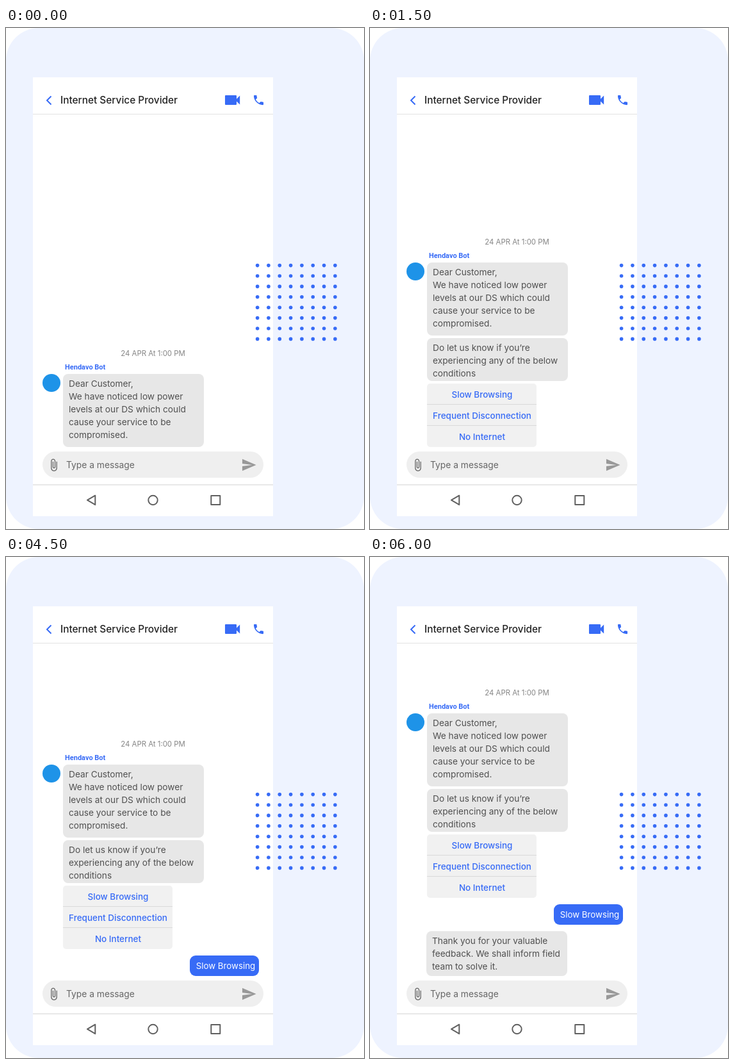
Write an HTML page that moves like this. It is 559 px wide and 782 px high and loops after 7.5 s.

```html
<!DOCTYPE html>
<html lang="en">
<head>
<meta charset="utf-8">
<title>Chat</title>
<style>
  html, body { margin: 0; width: 100%; height: 100%; overflow: hidden; background: #fff; }
  svg { display: block; width: 100%; height: 100%; }
  text { font: 13.7px Inter, sans-serif; fill: #505050; }
  .title { font-size: 15.4px; font-weight: 500; fill: #222; }
  .date { font-size: 11.4px; fill: #858585; }
  .name { font: bold 11px Roboto, sans-serif; fill: #376bf6; }
  .option { font-size: 13.5px; font-weight: 500; fill: #376bf6; }
  .answer { font-size: 13.3px; fill: #fff; }
  .hint { font-size: 13.8px; fill: #666; }
  .mid { text-anchor: middle; }
  .blue { fill: #376bf6; }
  .bubble { fill: #e7e7e7; }
  .nav { fill: none; stroke: #606060; stroke-width: 2; stroke-linejoin: round; }
</style>
</head>
<body>
<svg viewBox="0 0 559 782">
  <rect width="559" height="782" rx="51" fill="#eef3ff"/>
  <path d="M42 77h375v685H42z" fill="#fff"/>

  <path d="M70.5 106.5l-6.5 6.5 6.5 6.5" fill="none" stroke="#376bf6" stroke-width="2"/>
  <text class="title" x="85" y="118">Internet Service Provider</text>
  <path class="blue" transform="translate(338.1 97.4) scale(1.29 1.26)" d="M17 10.5V7c0-.55-.45-1-1-1H4c-.55 0-1 .45-1 1v10c0 .55.45 1 1 1h12c.55 0 1-.45 1-1v-3.5l4 4v-11l-4 4z"/>
  <path class="blue" transform="translate(384.4 102.5) scale(.84)" d="M6.62 10.79c1.44 2.83 3.76 5.14 6.59 6.59l2.2-2.2c.27-.27.67-.36 1.02-.24 1.12.37 2.33.57 3.57.57.55 0 1 .45 1 1V20c0 .55-.45 1-1 1-9.39 0-17-7.61-17-17 0-.55.45-1 1-1h3.5c.55 0 1 .45 1 1 0 1.25.2 2.45.57 3.57.11.35.03.74-.25 1.02l-2.2 2.2z"/>
  <path d="M42 134h375v1H42z" fill="#e2e2e2"/>

  <g id="thread"></g>

  <rect x="57" y="661" width="345" height="41" rx="20.5" fill="#efefef"/>
  <path fill="#666" transform="translate(64 671.5) scale(.88)" d="M16.5 6v11.5c0 2.21-1.79 4-4 4s-4-1.79-4-4V5c0-1.38 1.12-2.5 2.5-2.5s2.5 1.12 2.5 2.5v10.5c0 .55-.45 1-1 1s-1-.45-1-1V6H10v9.5c0 1.38 1.12 2.5 2.5 2.5s2.5-1.12 2.5-2.5V5c0-2.21-1.79-4-4-4S7 2.79 7 5v12.5c0 3.04 2.46 5.5 5.5 5.5s5.5-2.46 5.5-5.5V6z"/>
  <text class="hint" x="94" y="687">Type a message</text>
  <path fill="#999" transform="translate(366.9 669.6) scale(1.03)" d="M2 21l21-9L2 3v7l15 2-15 2z"/>
  <path d="M42 712h375v2H42z" fill="#e8e8e8"/>
  <g class="nav">
    <path d="M139.3 729.7L127 736.9l12.3 7.2z"/>
    <circle cx="229.5" cy="737" r="7.2"/>
    <path d="M320.3 730h14v14h-14z"/>
  </g>
  <g id="dots" class="blue"></g>
</svg>
<script>
const LOOP = 7500;
// Each step starts at a time and lifts the thread to make room.
const steps = [[0, 0], [1500, 174], [4500, 216], [6000, 296]];

const text = (s, x, y, cls = '') => `<text class="${cls}" x="${x}" y="${y}">${s}</text>`;
const box = (x, y, w, h, cls = 'bubble', r = 8) =>
  `<rect class="${cls}" x="${x}" y="${y}" width="${w}" height="${h}" rx="${r}"/>`;
const bubble = (x, y, h, lines) =>
  box(x, y, 220, h) + lines.map((s, i) => text(s, x + 9, y + 20 + 20 * i)).join('');

const options = ['Slow Browsing', 'Frequent Disconnection', 'No Internet'];
const parts = [
  text('24 APR At 1:00 PM', 229.5, 512, 'date mid') +
  text('Hendavo Bot', 92, 533, 'name') +
  '<circle cx="71" cy="554" r="14" fill="#1e93e8"/>' +
  bubble(89, 540, 114, ['Dear Customer,', 'We have noticed low power',
    'levels at our DS which could', 'cause your service to be', 'compromised.']),

  bubble(89, 658, 67, ['Do let us know if you’re', 'experiencing any of the below', 'conditions']) +
  '<rect x="89" y="729" width="171" height="99" rx="5" fill="#f1f1f1"/>' +
  '<path d="M89 761h171v1H89zm0 33h171v1H89z" fill="#d9d9d9"/>' +
  options.map((s, i) => text(s, 175, 751 + 33 * i, 'option mid')).join(''),

  box(287, 838, 108, 32, 'blue', 9) + text(options[0], 343, 859, 'answer mid'),

  bubble(88, 880, 70, ['Thank you for your valuable', 'feedback. We shall inform field', 'team to solve it.'])
];

const thread = document.getElementById('thread');
thread.innerHTML = parts.map(p => `<g>${p}</g>`).join('');

let dots = '';
for (let i = 0; i < 64; i++)
  dots += `<circle cx="${392.6 + 17.33 * (i % 8)}" cy="${370.6 + 16.4 * (i >> 3)}" r="2.8"/>`;
document.getElementById('dots').innerHTML = dots;

const start = performance.now();
function draw(now) {
  const t = Math.max(0, now - start) % LOOP;
  const n = steps.filter(([from]) => t >= from).length;
  thread.setAttribute('transform', `translate(0 ${-steps[n - 1][1]})`);
  [...thread.children].forEach((g, i) => g.setAttribute('visibility', i < n ? 'visible' : 'hidden'));
  requestAnimationFrame(draw);
}
draw(start);
</script>
</body>
</html>
```
